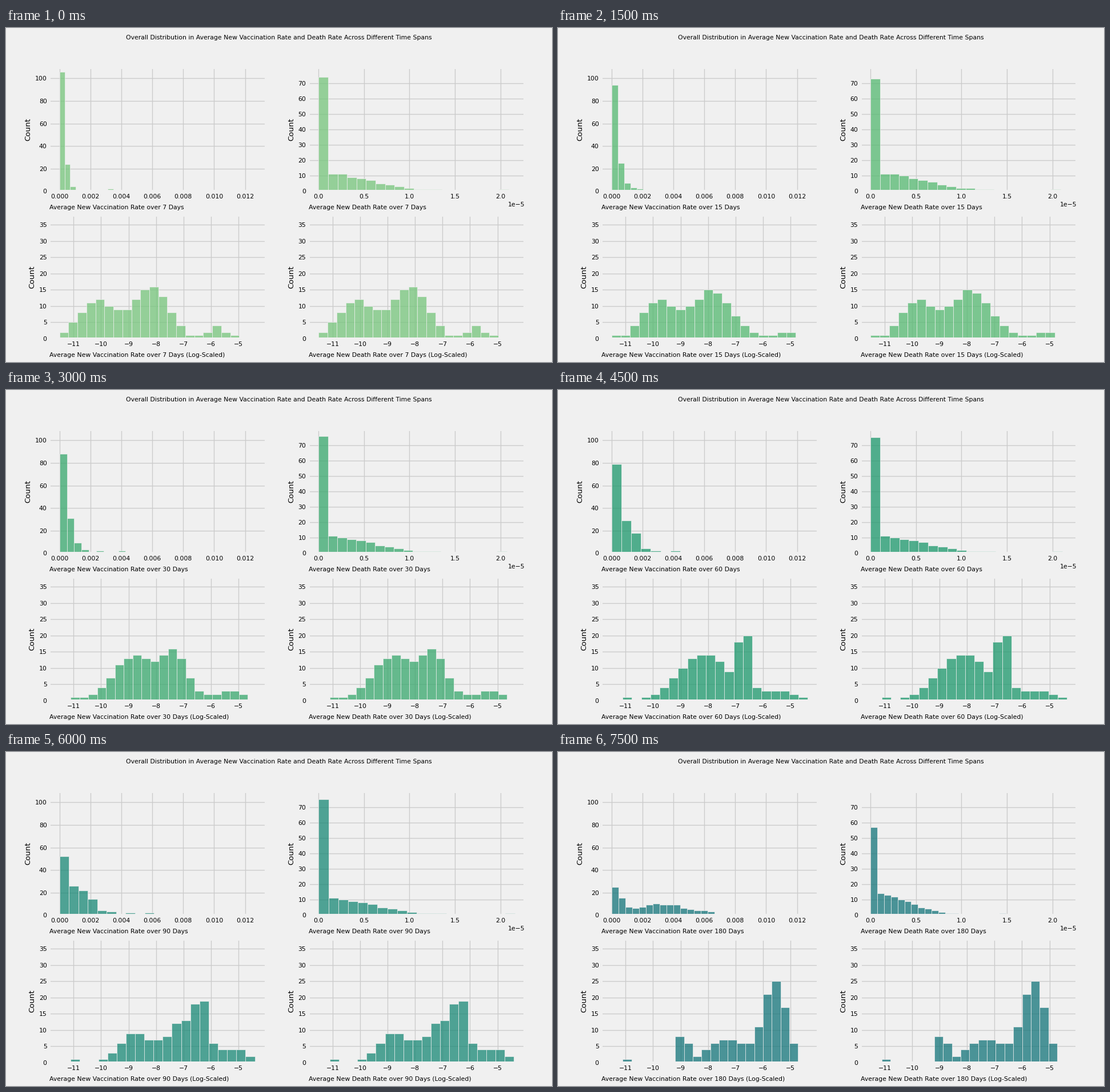
A matplotlib script that plays this animation: 956 px wide and 586 px high, repeating every 8000 ms.

```python
from collections import namedtuple

import matplotlib.pyplot as plt
import numpy as np
from matplotlib.animation import FuncAnimation
from matplotlib.ticker import MultipleLocator

BG = "#f0f0f0"
GRID = "#cbcbcb"
STEP = 500      # ms per frame
HOLD = 1500     # ms per time span
LOOP = 8000
DPI = 97.5
BINS = 20
PLACES = 139    # places counted in each death rate histogram

# low, high: range of vaccination rates; death: highest death rate
# first: places in the lowest death bin
# humps: (centre bin, height, spread) of the log-scaled rates
Span = namedtuple("Span", "days color low high death first humps")
SPANS = [
    Span(7, "#75c57b", 1.0e-5, 0.00694, 2.09e-5, 74,
         [(3.8, 11.5, 2.9), (9.8, 16, 2.7), (17, 3.5, 1.3)]),
    Span(15, "#54b970", 1.0e-5, 0.00812, 2.09e-5, 73,
         [(4.6, 12, 2.4), (10.4, 15, 3.0), (18.5, 2, 2)]),
    Span(30, "#37a76c", 1.5e-5, 0.00950, 2.07e-5, 76,
         [(6.8, 14, 3.4), (11.4, 13.3, 1.9), (17.5, 3, 2.5)]),
    Span(60, "#1b976b", 1.5e-5, 0.01269, 2.11e-5, 75,
         [(8.2, 14.4, 3.8), (12.57, 21.5, 0.8), (16, 3, 2.5)]),
    Span(90, "#188875", 1.5e-5, 0.01222, 2.16e-5, 75,
         [(6.5, 9.5, 2.2), (11.8, 12.5, 2.6), (13.7, 14, 0.9), (17.3, 4, 2)]),
    Span(180, "#137479", 1.5e-5, 0.00890, 1.49e-5, 57,
         [(6.4, 10, 0.7), (11.5, 7.5, 3.2), (16.85, 25, 1.8)]),
]

plt.rcParams.update({
    "font.family": "DejaVu Sans",
    "figure.facecolor": BG, "axes.facecolor": BG,
    "axes.edgecolor": BG, "axes.linewidth": 3,
    "axes.grid": True, "axes.axisbelow": True,
    "grid.color": GRID, "grid.linewidth": 1,
    "xtick.major.size": 0, "ytick.major.size": 0,
    "xtick.labelsize": 8, "ytick.labelsize": 8,
})

fig, axes = plt.subplots(2, 2, figsize=(956 / DPI, 586 / DPI), dpi=DPI)
fig.subplots_adjust(left=0.08, right=0.95, bottom=0.07, top=0.88,
                    wspace=0.2, hspace=0.2)
fig.suptitle("Overall Distribution in Average New Vaccination Rate and "
             "Death Rate Across Different Time Spans", fontsize=8)


def setup(ax, low, high, top, xstep, ystep):
    pad = 0.05 * (high - low)
    ax.set_xlim(low - pad, high + pad)
    ax.set_ylim(0, top * 1.05)
    ax.xaxis.set_major_locator(MultipleLocator(xstep))
    ax.yaxis.set_major_locator(MultipleLocator(ystep))
    ax.set_ylabel("Count", fontsize=10)


LOWEST = min(s.low for s in SPANS)
HIGHEST = max(s.high for s in SPANS)
setup(axes[0, 0], 0, HIGHEST, 104, 0.002, 20)
setup(axes[0, 1], 0, max(s.death for s in SPANS), 76, 0.5e-5, 10)
for axis in axes[1]:
    setup(axis, np.log(LOWEST), np.log(HIGHEST), 36, 1, 5)


def log_counts(span):
    i = np.arange(BINS)
    total = sum(h * np.exp(-((i - c) / s) ** 2) for c, h, s in span.humps)
    counts = np.rint(total).astype(int)
    counts[[0, -1]] = np.maximum(counts[[0, -1]], 1)
    return counts


def rate_counts(span, logs):
    """Spread each log bin evenly and count again on the linear scale."""
    spots = np.concatenate([i + (np.arange(n) + 0.5) / n
                            for i, n in enumerate(logs) if n])
    rates = span.low * (span.high / span.low) ** (spots / BINS)
    return np.histogram(rates, BINS, (0, span.high))[0]


def death_counts(span):
    tail = np.exp(-(np.arange(1, BINS) / 7) ** 2)
    tail *= (PLACES - span.first) / tail.sum()
    counts = np.append(span.first, np.rint(tail))
    counts[-1] = 1
    return counts


drawn = []


def histogram(ax, low, high, counts, color, label):
    edges = np.linspace(low, high, BINS + 1)
    full = counts > 0
    drawn.append(ax.bar(edges[:-1][full], counts[full], edges[1] - edges[0],
                        align="edge", facecolor=(color, 0.75),
                        edgecolor=BG, linewidth=0.5))
    ax.set_xlabel(label, fontsize=8, loc="left", labelpad=7)


def draw(frame):
    while drawn:
        drawn.pop().remove()
    span = SPANS[frame * STEP // HOLD]
    logs = log_counts(span)
    panels = [("Vaccination", span.high, rate_counts(span, logs)),
              ("Death", span.death, death_counts(span))]
    for col, (name, high, counts) in enumerate(panels):
        label = f"Average New {name} Rate over {span.days} Days"
        histogram(axes[0, col], 0, high, counts, span.color, label)
        histogram(axes[1, col], np.log(span.low), np.log(span.high), logs,
                  span.color, label + " (Log-Scaled)")
    return []


anim = FuncAnimation(fig, draw, frames=LOOP // STEP, init_func=lambda: draw(0),
                     interval=STEP, repeat=True, repeat_delay=0)
plt.show()
```
